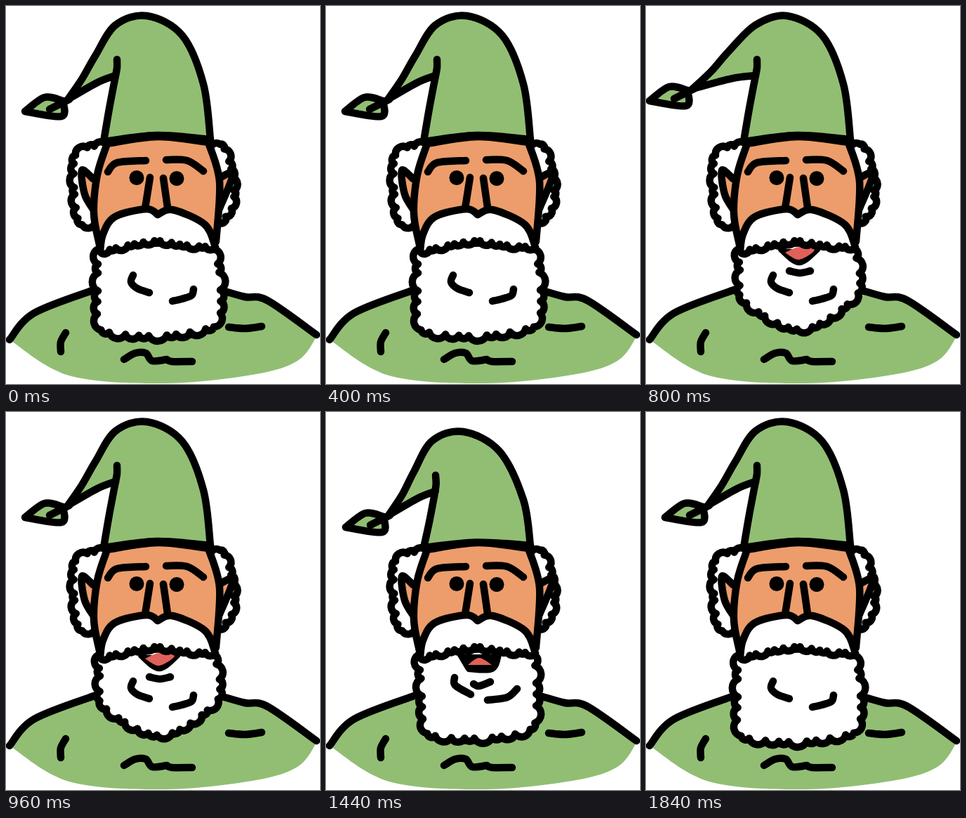
An HTML page that plays this animation: 447 by 538 pixels, repeating every 1.92 s.

```html
<!DOCTYPE html>
<html lang="en">
<head>
<meta charset="utf-8">
<title>Talking gnome</title>
<style>
html, body { margin: 0; width: 100%; height: 100%; overflow: hidden; background: #fff; }
svg { display: block; width: 100%; height: 100%; }
path { fill: none; stroke: #000; stroke-width: 10.5; stroke-linecap: round; stroke-linejoin: round; }
.green { fill: #92be73; }
.skin { fill: #ec9d6b; }
.white { fill: #fff; }
.black { fill: #000; }
.brown { fill: #98452f; }
.tongue { fill: #e0605a; }
.bare { stroke: none; }

/* Poses sit side by side, 1000px apart; each strip jumps between them. */
#hats { animation: hat 1920ms step-end infinite; }
#beards { animation: talk 1920ms step-end infinite; }
@keyframes hat {
  0%, 8.333%, 50%, 79.166% { translate: 0px; }
  4.166%, 29.166%, 45.833% { translate: -1000px; }
  33.333% { translate: -2000px; }
  58.333% { translate: -3000px; }
}
@keyframes talk {
  0%, 8.333%, 20.833%, 45.833%, 79.166%, 95.833% { translate: 0px; }
  12.5%, 29.166%, 41.666%, 50%, 62.5%, 70.833%, 91.666% { translate: -1000px; }
  33.333%, 66.666% { translate: -2000px; }
  4.166%, 37.5%, 58.333%, 75%, 87.5% { translate: -3000px; }
}
</style>
</head>
<body>
<svg viewBox="0 0 447 538">
  <defs>
    <path id="chinLeft" data-p="181 383 178 393 187 402 204 408"/>
    <path id="chinRight" data-p="267 403 264 412 250 417 237 420"/>
  </defs>

  <!-- body -->
  <path class="green bare" data-p="5 475 40 437 128 403 | 308 405 | 370 417 443 469 | 415 505 350 525 225 537 90 526 5 475"/>
  <path data-p="5 475 40 437 128 403"/>
  <path data-p="308 405 340 414 372 419 442 468"/>
  <path data-p="85 465 78 478 78 492"/>
  <path data-p="317 457 340 459 364 456"/>
  <path data-p="168 503 184 494 199 494 208 505 229 503 | 236 506 265 506"/>

  <!-- hair and ears -->
  <path class="white" data-p="143 198 | ~11 112 203 97 222 103 304 126 310"/>
  <path class="white" data-p="291 204 | ~-10 308 199 323 245 322 285 304 309"/>
  <path class="skin" data-p="124 246 108 234 112 268 125 291"/>
  <path class="skin" data-p="302 246 323 239 304 288"/>

  <!-- face -->
  <path class="skin" data-p="144 196 130 240 125 295 133 340 | 299 335 | 304 250 288 194 | 216 186 144 196"/>
  <path data-p="145 236 158 223 199 220"/>
  <path data-p="228 219 258 220 281 235"/>
  <circle cx="186" cy="244.500" r="10.500"/>
  <circle cx="243" cy="245.500" r="10.500"/>
  <path data-p="205 244 198 288"/>
  <path data-p="224 245 230 287"/>

  <g id="beards">
    <g>
      <path class="white" data-p="131 346 | ~21 131 405 131 450 145 464 220 469 290 458 304 447 304 385 296 346"/>
      <use href="#chinLeft"/><use href="#chinRight"/>
    </g>
    <g transform="translate(1000)">
      <path class="white" data-p="131 346 | ~20 135 385 140 420 220 460 294 418 304 385 296 346"/>
      <path class="black" data-p="193 346 218 364 243 346"/>
      <path class="tongue bare" data-p="198 351 218 343 240 347 218 361 198 351"/>
      <path data-p="204 377 219 380 234 377"/>
      <use href="#chinLeft"/><use href="#chinRight"/>
    </g>
    <g transform="translate(2000)">
      <path class="white" data-p="131 346 | ~20 135 385 140 420 225 446 294 418 304 385 296 346"/>
      <path class="brown" data-p="167 346 188 366 252 366 270 344"/>
      <path class="black" data-p="190 360 220 351 247 361 190 360"/>
      <path class="tongue bare" data-p="199 360 220 356 239 360 199 360"/>
      <path data-p="176 381 178 393 203 405"/>
      <path data-p="208 387 217 391 234 383"/>
      <use href="#chinRight"/>
    </g>
    <g transform="translate(3000)">
      <path class="white" data-p="131 346 | ~20 136 385 138 430 145 458 220 464 288 453 298 430 299 385 296 346"/>
      <path class="black" data-p="192 345 204 365 | 236 365 245 345"/>
      <path class="tongue bare" data-p="202 360 218 350 236 360"/>
      <path data-p="183 378 184 389 206 402"/>
      <path data-p="210 387 218 390 234 384"/>
      <path data-p="230 410 258 406 272 394"/>
    </g>
  </g>

  <!-- moustache -->
  <path class="white" data-p="134 350 138 325 155 300 200 289 216 297 | 237 290 283 311 298 343 | ~-13 255 340 215 334 175 340 134 350"/>

  <g id="hats"></g>
</svg>
<script>
const POINTS = {
  cone: '88 133 108 104 127 71 156 27 201 14 251 42 281 111 291 190 | 214 184 139 193 | 147 146 156 99 | 130 109 88 133',
  crease: '158 76 158 88 156 99',
  leaf: '27 150 55 130 81 135 | 79 157 27 150',
  thread: '62 147 90 133'
};
const POSES = [
  { dx: 0, dy: 0, sag: 0 },
  { dx: -9, dy: -8, sag: 0 },
  { dx: -22, dy: -15, sag: 0 },
  { dx: 1, dy: 0, sag: 14 }
];

const clamp = v => Math.min(1, Math.max(0, v));

function bezier(pts) {
  let d = '';
  for (let i = 0; i < pts.length - 1; i++) {
    const b = pts[i], c = pts[i + 1], a = pts[i - 1] || b, e = pts[i + 2] || c;
    const c1 = b.map((v, k) => v + (c[k] - a[k]) / 6);
    const c2 = c.map((v, k) => v - (e[k] - b[k]) / 6);
    d += `C${c1} ${c2} ${c}`;
  }
  return d;
}

// Curly edge: uneven round lobes along a guide curve.
function curls(pts, count) {
  const guide = document.createElementNS('http://www.w3.org/2000/svg', 'path');
  guide.setAttribute('d', 'M' + pts[0] + bezier(pts));
  const n = Math.abs(count), sweep = count < 0 ? 1 : 0, step = guide.getTotalLength() / n;
  let d = '', from = guide.getPointAtLength(0);
  for (let i = 1; i <= n; i++) {
    const wobble = i < n ? 0.2 * Math.sin(i * 2.4) : 0;
    const to = guide.getPointAtLength((i + wobble) * step);
    const r = 0.55 * Math.hypot(to.x - from.x, to.y - from.y);
    d += `A${r} ${r} 0 0 ${sweep} ${to.x} ${to.y}`;
    from = to;
  }
  return d;
}

// "|" marks a corner, "~n" a part with n curls (negative: clockwise lobes).
function trace(text, move = p => p) {
  let last, d = '';
  for (const part of text.split('|')) {
    const [, count, coords] = part.trim().match(/^(?:~(-?\d+))?(.*)$/);
    const n = coords.trim().split(/\s+/).map(Number);
    const pts = last ? [last] : [];
    for (let i = 0; i < n.length; i += 2) pts.push(move([n[i], n[i + 1]]));
    if (!last) d = 'M' + pts[0];
    d += count ? curls(pts, +count) : bezier(pts);
    last = pts[pts.length - 1];
  }
  return d;
}

// The tail swings towards its tip; the whole cone sags above its rim.
function hat({ dx, dy, sag }, index) {
  const bend = ([x, y]) => {
    const tail = y < 140 ? clamp((156 - x) / 68) : 0;
    const lean = sag * 0.4 * clamp((110 - y) / 96);
    return [x + dx * tail - lean, y + dy * tail + sag * clamp((190 - y) / 57)];
  };
  const swing = ([x, y]) => [x + dx, y + dy + sag];
  return `<g transform="translate(${index * 1000})">
    <path class="green" d="${trace(POINTS.cone, bend)}"/>
    <path d="${trace(POINTS.crease, bend)}"/>
    <path class="green" d="${trace(POINTS.leaf, swing)}"/>
    <path d="${trace(POINTS.thread, swing)}"/>
  </g>`;
}

document.getElementById('hats').innerHTML = POSES.map(hat).join('');
for (const path of document.querySelectorAll('[data-p]')) {
  path.setAttribute('d', trace(path.dataset.p));
}
</script>
</body>
</html>
```
